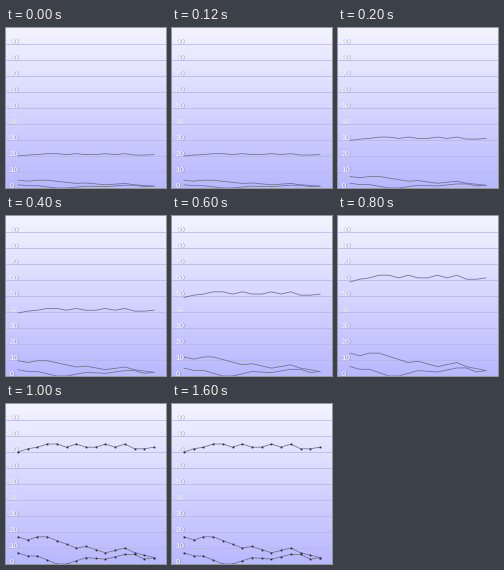
Recreate the animation shown at these times as a matplotlib script. Size 160 by 160 pixels, loop 2 s.

```python
import matplotlib.pyplot as plt
import numpy as np
from matplotlib.animation import FuncAnimation

SIZE, DPI = 160, 100
PX = 72 / DPI          # points per pixel
UNIT = 1.6             # pixels per chart unit
POINTS = 15
HOLD = 5               # tick at which the chart is fully grown

fig = plt.figure(figsize=(SIZE / DPI, SIZE / DPI), dpi=DPI)
ax = fig.add_axes([0, 0, 1, 1])
ax.axis("off")


def keyed(*keys):
    """Values at every point, interpolated between (index, value) keys."""
    return np.interp(np.arange(POINTS), *zip(*keys))


def zigzag(period=2.55, peak=3.5):
    wave = np.cos(2 * np.pi * (np.arange(POINTS) - peak) / period)
    return np.sign(wave - 0.2)


def draw_background():
    top, bottom = np.array([243, 243, 255]), np.array([184, 184, 255])
    t = np.linspace(0, 1, SIZE)[:, None, None]
    ax.imshow((top + (bottom - top) * t) / 255, extent=(0, SIZE, SIZE, 0),
              aspect="auto", interpolation="nearest")


def draw_label(value, y):
    style = dict(family="Liberation Sans", fontsize=8 * PX,
                 ha="left", va="baseline")
    ax.text(4.3, y + 0.7, str(value), color="#77778c", alpha=0.6, **style)
    ax.text(3.5, y, str(value), color="white", zorder=4, **style)


def growth(tick):
    return 1 if tick == HOLD else 0.286 + 0.1385 * tick


draw_background()
for value in range(0, 100, 10):
    y = SIZE - UNIT * value
    if value:
        ax.plot([0, SIZE], [y - 0.5] * 2, color="#b4b4e8", lw=PX, alpha=0.75)
    draw_label(value, y - 0.3)

series = [
    np.round(keyed((0, 71), (1, 71), (2, 74), (11, 74), (14, 72)) + zigzag()),
    keyed((0, 17), (1, 15), (2, 17), (3, 17), (6, 10), (7, 11),
          (9, 7), (11, 10), (12, 7), (14, 4)),
    keyed((0, 7), (1, 5), (2, 5), (4, 0), (5, 0), (7, 4),
          (9, 3), (11, 6), (12, 6), (13, 3), (14, 4)),
]
xs = np.linspace(12, 148, POINTS)
lines = [ax.plot([], [], color="#72728a", lw=0.8 * PX, marker="s",
                 ms=1.7 * PX, mfc="#202028", mew=0, snap=False)[0]
         for _ in series]
ax.set_xlim(0, SIZE)
ax.set_ylim(SIZE, 0)


def update(i):
    tick = min(i, HOLD)
    for line, values in zip(lines, series):
        line.set_data(xs, SIZE - UNIT * values * growth(tick))
        line.set_marker("s" if tick == HOLD else "None")
    return lines


anim = FuncAnimation(fig, update, frames=10, interval=200,
                     repeat=True, repeat_delay=0, blit=False)
plt.show()
```
